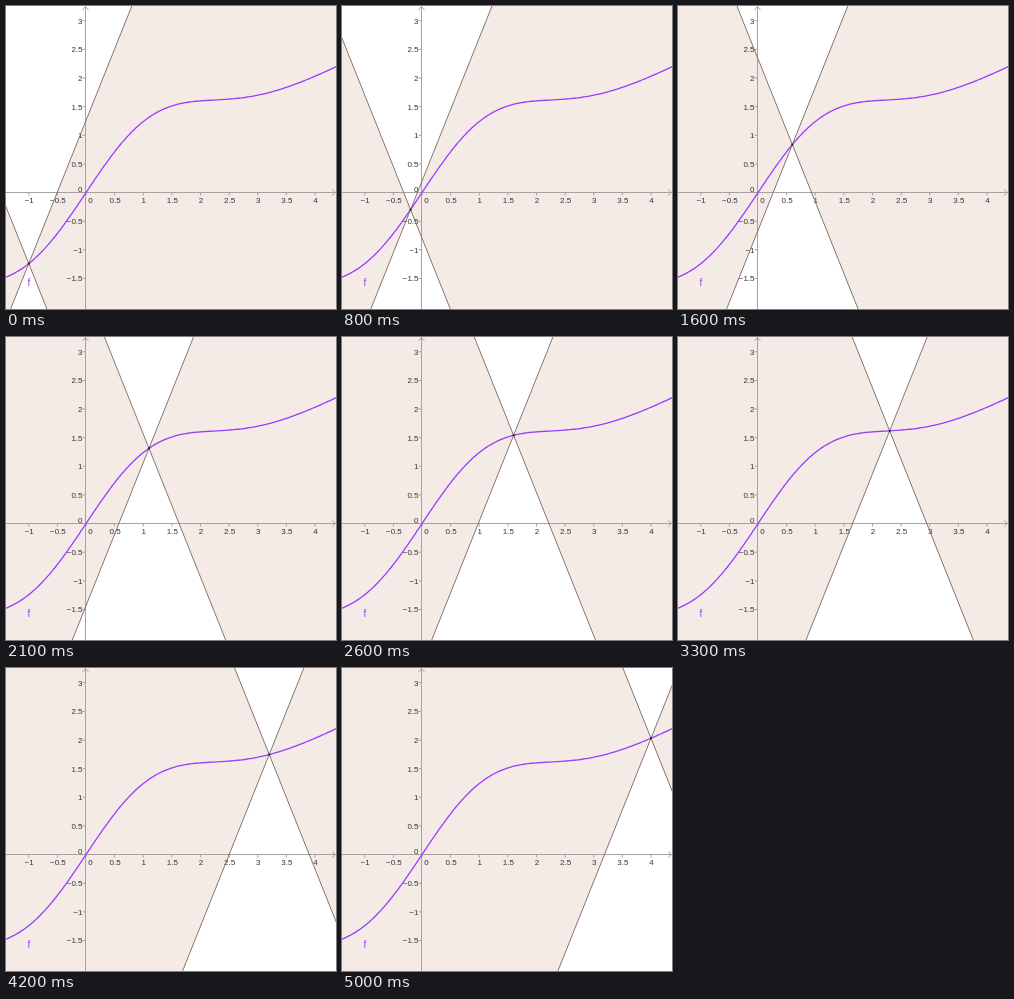
Recreate the animation shown at these times as an HTML page with a canvas. Size 330 by 303 pixels, loop 5.1 s.

```html
<!DOCTYPE html>
<html lang="en">
<head>
<meta charset="utf-8">
<title>Double cone sliding along a curve</title>
<style>
  html, body { margin: 0; width: 100%; height: 100%; overflow: hidden; }
  canvas { display: block; }
</style>
</head>
<body>
<canvas id="stage" width="330" height="303"></canvas>
<script>
const ctx = document.getElementById("stage").getContext("2d");
const W = 330, H = 303, UNIT = 57.25, OX = 80, OY = 186.6;
const AXIS_X = 79.5, AXIS_Y = 186.5;
const SLOPE = 2.5, STEP_MS = 100, STEPS = 51;

const f = x => x / 2 + x * Math.exp(-0.3 * x * x);
const px = x => OX + x * UNIT;
const py = y => OY - y * UNIT;
const label = v => String(v).replace("-", "\u2212");

function stroke(color, width, ...lines) {
  ctx.strokeStyle = color;
  ctx.lineWidth = width;
  ctx.beginPath();
  for (const line of lines) {
    line.forEach(([x, y], i) => i ? ctx.lineTo(x, y) : ctx.moveTo(x, y));
  }
  ctx.stroke();
}

function drawCone(cx, cy) {
  const top = cy / SLOPE, bottom = (H - cy) / SLOPE;
  const rising = [[cx - bottom, H], [cx + top, 0]];
  const falling = [[cx - top, 0], [cx + bottom, H]];
  ctx.fillStyle = "#f4eae6";
  ctx.fillRect(0, 0, W, H);
  ctx.fillStyle = "#fff";
  ctx.beginPath();
  for (const [x, y] of [falling[0], rising[1], rising[0], falling[1]]) ctx.lineTo(x, y);
  ctx.fill();
  return [rising, falling];
}

function drawAxes() {
  const ticks = [];
  ctx.font = "8px 'Liberation Sans', Arial, sans-serif";
  ctx.fillStyle = "#333";
  for (let v = -1; v <= 4; v += 0.5) {
    const x = px(v), y = py(v);
    ctx.textAlign = "center";
    ctx.fillText(label(v), v ? x + 0.5 : x + 4.5, 196.5);
    ticks.push([[x, AXIS_Y], [x, AXIS_Y + 3]]);
  }
  for (let v = -1.5; v <= 3; v += 0.5) {
    const y = py(v);
    ctx.textAlign = "right";
    ctx.fillText(label(v), 76.5, v ? y + 3 : y - 1);
    ticks.push([[AXIS_X - 3, y], [AXIS_X, y]]);
  }
  stroke("#aaa19e", 1,
    [[0, AXIS_Y], [W, AXIS_Y]],
    [[AXIS_X, 0], [AXIS_X, H]],
    [[W - 4, AXIS_Y - 3], [W - 0.5, AXIS_Y], [W - 4, AXIS_Y + 3]],
    [[AXIS_X - 3, 4], [AXIS_X, 0.5], [AXIS_X + 3, 4]],
    ...ticks);
}

function drawCurve() {
  const points = [];
  for (let x = -2; x <= W + 2; x += 2) points.push([x, py(f((x - OX) / UNIT))]);
  stroke("#9b3dff", 1.3, points);
  ctx.font = "10px 'Liberation Sans', Arial, sans-serif";
  ctx.textAlign = "center";
  ctx.fillStyle = "#9b3dff";
  ctx.fillText("f", 23, 280);
}

function draw(now) {
  const step = Math.floor(now / STEP_MS) % STEPS;
  const x = -1 + step / 10;
  const cx = px(x), cy = py(f(x));
  const edges = drawCone(cx, cy);
  drawAxes();
  drawCurve();
  stroke("#79675f", 0.9, ...edges);
  ctx.fillStyle = "#222";
  ctx.beginPath();
  ctx.arc(cx, cy, 1.1, 0, 2 * Math.PI);
  ctx.fill();
}

const start = performance.now();
function tick() {
  draw(performance.now() - start);
  requestAnimationFrame(tick);
}
tick();
</script>
</body>
</html>
```
